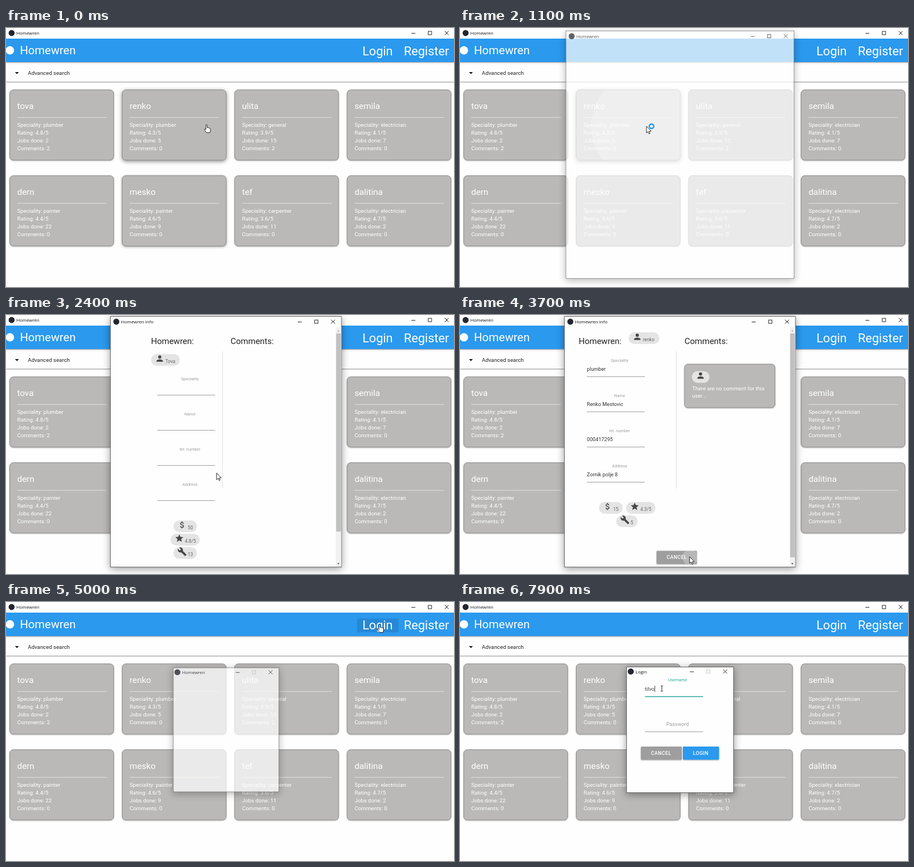
These frames come from a looping animation (800x464 px, 8 s). An HTML page:

```html
<!DOCTYPE html>
<html lang="en">
<head>
<meta charset="utf-8">
<title>Homewren</title>
<style>
  html, body { margin: 0; width: 100%; height: 100%; overflow: hidden; background: #fefefe; }
  svg { display: block; width: 800px; height: 464px; font-family: Roboto, sans-serif; }
  .title { font-family: "Open Sans", sans-serif; }
  .mid { text-anchor: middle; }
  .bar { filter: drop-shadow(0 1px 1.2px rgba(0,0,0,.45)); }
  .card { stroke: #8b8a89; filter: drop-shadow(0 1px 1px rgba(0,0,0,.25)); }
  .card.warm { filter: drop-shadow(0 1px 2px rgba(0,0,0,.4)); }
  .card.hover { filter: drop-shadow(0 2px 3.5px rgba(0,0,0,.45)); }
  .window { stroke: #666; filter: drop-shadow(0 3px 7px rgba(0,0,0,.4)); }
  .button { filter: drop-shadow(0 1px 1px rgba(0,0,0,.35)); }
  .caps { font-weight: 500; letter-spacing: .35px; }
  .cursor path { stroke: #111; stroke-width: .9; fill: #fff; stroke-linejoin: round; }
</style>
</head>
<body>
<svg id="stage" viewBox="0 0 800 464"></svg>
<script>
const LOOP = 8000, STEP = 100;
const APP = 'Homewren', BLUE = '#2a99ee', GREY = '#bab9b8', MUTED = '#9e9e9e', TEAL = '#26a69a';

const people = [
  ['tova', 'plumber', '4.8', 2, 2], ['renko', 'plumber', '4.3', 5, 0],
  ['ulita', 'general', '3.9', 15, 2], ['semila', 'electrician', '4.1', 7, 0],
  ['dern', 'painter', '4.4', 22, 0], ['mesko', 'painter', '4.6', 9, 0],
  ['tef', 'carpenter', '3.6', 11, 0], ['dalitina', 'electrician', '4.7', 2, 0]
];
const USER = 'tilvo';

// Markup helpers
const text = (x, y, size, str, fill = '#222', extra = '') =>
  `<text x="${x}" y="${y}" font-size="${size}" fill="${fill}" ${extra}>${str}</text>`;
const rect = (x, y, w, h, fill, extra = '') =>
  `<rect x="${x}" y="${y}" width="${w}" height="${h}" fill="${fill}" ${extra}/>`;
const path = (d, fill, extra = '') => `<path d="${d}" fill="${fill}" ${extra}/>`;
const line = (d, stroke, extra = '') => path(d, 'none', `stroke="${stroke}" ${extra}`);
const group = (id, body) => `<g id="${id}">${body}</g>`;

const icons = {
  person: '<circle cx="12" cy="8" r="4"/><path d="M12 14c-2.7 0-8 1.3-8 4v2h16v-2c0-2.7-5.3-4-8-4z"/>',
  star: '<path d="M12 17.3 18.2 21l-1.6-7L22 9.2l-7.2-.6L12 2 9.2 8.6 2 9.2 7.5 14 5.8 21z"/>',
  dollar: '<path d="M15 9c0-2-1.2-3-3.2-3S8 7 8 8.8c0 4 7.5 2.2 7.5 6.4 0 1.8-1.3 3-3.6 3S8 17 7.7 15M11.5 3v3m0 12v3" fill="none" stroke="#484848" stroke-width="2.1"/>',
  wrench: '<path d="M22.7 19l-9.1-9.1c.9-2.3.4-5-1.5-6.9-2-2-5-2.4-7.4-1.3L9 6 6 9 1.6 4.7C.4 7.1.9 10.1 2.9 12.1c1.9 1.9 4.6 2.4 6.9 1.5l9.1 9.1c.4.4 1 .4 1.4 0l2.3-2.3c.5-.4.5-1.1.1-1.4z"/>'
};

function chip(x, y, w, icon, label = '') {
  return rect(x, y, w, 21, '#e4e4e4', 'rx="10.5"') +
    `<g transform="translate(${x + 7} ${y - .5}) scale(.71)" fill="#484848">${icons[icon]}</g>` +
    text(x + 25.5, y + 16, 8.3, label, '#666');
}

function titleBar(x, right, y, id, dimMax) {
  const close = right - 15.5, max = right - 45.5, min = right - 75;
  return `<circle cx="${x + 10}" cy="${y}" r="5.4" fill="#23252f"/>` +
    text(x + 18.5, y + 3, 8, APP, '#111', `id="${id}" class="title"`) +
    line(`M${min - 3.5} ${y + .5}h7`, '#222') +
    rect(max - 3, y - 3, 6, 6, 'none', `stroke="${dimMax ? '#ccc' : '#222'}"`) +
    line(`M${close - 3.5} ${y - 3.5}l7 7m0-7l-7 7`, '#222');
}

function button(x, y, w, fill, label) {
  return rect(x, y, w, 23.5, fill, 'rx="1.4" class="button"') +
    text(x + 18, y + 14.5, 9, label, '#fff', 'class="caps"');
}

const cardAt = i => ({ x: 6.7 + i % 4 * 200.8, y: 110.8 + (i >> 2) * 153.8 });

function card([name, job, rating, jobs, comments], i) {
  const { x, y } = cardAt(i);
  const rows = [`Speciality: ${job}`, `Rating: ${rating}/5`, `Jobs done: ${jobs}`, `Comments: ${comments}`];
  return rect(x, y, 185.6, 126, GREY, 'rx="6.5" class="card person"') +
    (i === 1 ? `<clipPath id="cardClip">${rect(x, y, 185.6, 126, '#fff', 'rx="6.5"')}</clipPath>
      <circle id="cardRipple" cx="330" cy="176" fill="#fff" clip-path="url(#cardClip)"/>` : '') +
    text(x + 13.3, y + 34, 15.4, name, '#fff') +
    line(`M${x + 13.3} ${y + 49.5}h160`, '#e2e2e2') +
    rows.map((row, k) => text(x + 13.3, y + 66 + k * 14.2, 9.8, row, '#fff')).join('');
}

function fields(x, y, values = []) {
  return ['Speciality', 'Name', 'tel. number', 'Address'].map((label, i) => {
    const base = y + i * 63;
    return text(x + 58.5, base - 26.5, 7.4, label, MUTED, 'class="mid"') +
      line(`M${x} ${base}h103.5`, MUTED) + text(x, base - 10.5, 9.2, values[i] || '', '#333');
  }).join('');
}

function infoPage(headX, thumb) {
  return text(headX, 52, 15, APP + ':') + text(401, 52, 15, 'Comments:') +
    line('M386.5 65V311', '#e0e0e0') +
    rect(589, 22, 9.5, 429, '#f1f1f1') + rect(589.5, 33, 8.5, thumb, '#c1c1c1') +
    path('M591.5 29.500l2-2.500 2 2.500z', '#a3a3a3') + path('M591.5 444.500l2 2.500 2-2.500z', '#505050');
}

const mainPage =
  rect(0, 0, 800, 464, '#fefefe') +
  rect(0, 66, 800, 30, '#fefefe', 'class="bar"') + rect(0, 0, 800, 19, '#fff') +
  rect(0, 19, 800, 42, BLUE, 'class="bar"') + rect(0, 0, 800, 19, '#fff') +
  titleBar(0, 802.5, 9, 'mainTitle') +
  rect(627, 29.5, 74, 25, '#000', 'id="linkHover" opacity=".1" rx="1"') +
  '<circle cx="7" cy="40" r="7.5" fill="#fff"/>' +
  text(25, 47, 20.5, APP, '#fff') + text(636.5, 49, 22, 'Login', '#fff') + text(710.5, 49, 22, 'Register', '#fff') +
  path('M16 79h7l-3.500 3.500z', '#111') + text(39, 84, 9.8, 'Advanced search') +
  people.map(card).join('');

const infoWindow =
  rect(186.5, 2.5, 412.5, 449, '#fefefe', 'class="window"') + titleBar(187, 599.5, 12, 'infoTitle') +
  group('infoEmpty', infoPage(259, 355) + chip(259, 70, 51.5, 'person', 'Tova') + fields(270, 143.5) +
    chip(299, 368, 42, 'dollar', '50') + chip(294, 392, 52, 'star', '4.8/5') + chip(299, 416, 42, 'wrench', '13')) +
  group('infoFull', infoPage(212, 401) + chip(301, 31, 55, 'person', 'renko') +
    fields(226.5, 110.5, ['plumber', 'Renko Mestovic', '000417295', 'Zornik polje 8']) +
    chip(248, 335, 42.5, 'dollar', '15') + chip(296.5, 335, 52.5, 'star', '4.3/5') + chip(279, 359, 38, 'wrench', '5') +
    rect(401, 88, 161.5, 78, GREY, 'rx="6" class="card"') + chip(414, 100.5, 31.5, 'person') +
    text(414.5, 134.5, 9.6, 'There are no comment for this', '#fff') + text(414.5, 148, 9.6, 'user...', '#fff') +
    button(351, 422.5, 72, MUTED, 'CANCEL') +
    `<clipPath id="cancelClip">${rect(351, 422.5, 72, 23.5, '#fff')}</clipPath>
     <circle id="cancelRipple" cx="411" cy="434" fill="#fff" clip-path="url(#cancelClip)"/>`);

const loginWindow =
  rect(297.5, 116.5, 191, 225, '#fefefe', 'class="window"') + titleBar(295, 489, 124.5, 'loginTitle', true) +
  group('loginForm',
    text(388.5, 159, 9.2, 'Username', MUTED, 'id="userLabel" class="mid"') +
    line('M330.500 169.500h103.500', MUTED, 'id="userLine"') +
    text(330, 158.5, 9.2, '', '#444', 'id="typed"') + rect(330, 150, .9, 11, '#222', 'id="caret"') +
    text(388.5, 222, 9.2, 'Password', MUTED, 'class="mid"') + line('M330.500 232.500h103.500', MUTED) +
    button(323, 259, 73, MUTED, 'CANCEL') + button(398, 259, 64.5, BLUE, 'LOGIN'));

const cursors = `<g id="cursor" class="cursor">` +
  group('arrow', path('M0 0V12L2.8 9.6 4.6 13.6 6.4 12.8 4.7 8.900H8.400z', '#fff')) +
  group('hand', path('M-1 1a1.200 1.200 0 0 1 2.300 0V5.500l1.200-.3q.9 0 1 .9 1.600-.5 2 .6 1.500-.2 1.600 1.200V10q0 2-1 4.500H0Q-1.500 11.500-4 9.200q0-1.600 1.600-1L-1 9.200z', '#fff')) +
  group('beam', '<path d="M-2-5Q0-5 0-4 0-5 2-5M0-4V4M-2 5Q0 5 0 4 0 5 2 5" style="fill:none"/>') +
  `<circle id="busy" cx="9" cy="0" r="3.900" fill="#fff" stroke="${BLUE}" stroke-width="2.600"/></g>`;

const $ = id => document.getElementById(id);
$('stage').innerHTML = mainPage + group('info', infoWindow) + group('login', loginWindow) + cursors;
const cardRects = document.querySelectorAll('.person');

// Motion helpers
const clamp = v => Math.max(0, Math.min(1, v));
const smooth = p => p * p * (3 - 2 * p);
const mix = (a, b, p) => a + (b - a) * p;
const show = (id, on) => { $(id).style.display = on ? '' : 'none'; };
const inside = ([x, y], l, top, r, b) => x >= l && x <= r && y >= top && y <= b;

// Time, then pointer hotspot
const route = [
  [0, 358, 173], [700, 335, 177], [1100, 333, 176], [1600, 333, 176], [2400, 376, 283], [2700, 377, 287],
  [3500, 410, 433], [4000, 410, 433], [4600, 667, 40], [5200, 667, 40], [5900, 371, 170],
  [6200, 360.5, 155], [LOOP, 360.5, 155]
];

function pointer(t) {
  const i = route.findIndex(stop => stop[0] > t);
  const [t0, x0, y0] = route[i - 1], [t1, x1, y1] = route[i];
  const p = smooth((t - t0) / (t1 - t0));
  return [mix(x0, x1, p), mix(y0, y1, p)];
}

function popWindow(id, cx, cy, t, open, close) {
  const p = clamp(Math.min((t - open) / 140, 1 - (t - close) / 140));
  const s = mix(.85, 1, 1 - (1 - p) ** 2);
  show(id, p > 0);
  $(id).setAttribute('opacity', p);
  $(id).setAttribute('transform', `translate(${cx} ${cy}) scale(${s}) translate(${-cx} ${-cy})`);
  return p > 0;
}

function ripple(id, age, speed) {
  $(id).setAttribute('r', Math.max(0, age * speed));
  $(id).setAttribute('opacity', age > 0 ? .25 * clamp((700 - age) / 400) : 0);
}

function loginInput(t) {
  const p = clamp((t - 6300) / 200), focused = p > 0;
  const label = $('userLabel'), rule = $('userLine');
  label.setAttribute('y', mix(159, 142, p));
  label.setAttribute('font-size', mix(9.2, 7.4, p));
  label.setAttribute('fill', focused ? TEAL : MUTED);
  rule.setAttribute('stroke', focused ? TEAL : MUTED);
  rule.setAttribute('stroke-width', focused ? 1.5 : 1);
  $('typed').textContent = USER.slice(0, Math.max(0, Math.floor((t - 6900) / 180)));
  $('caret').setAttribute('x', 330.3 + $('typed').getComputedTextLength());
  show('caret', focused && (t >= 6900 || Math.floor((t - 6300) / 500) % 2 === 0));
}

function draw(now) {
  const t = Math.floor(now % LOOP / STEP) * STEP;
  const pos = pointer(t);
  const infoOpen = popWindow('info', 393, 227, t, 1000, 3900);
  const loginOpen = popWindow('login', 393, 229, t, 4900, LOOP + 500);

  $('infoTitle').textContent = t < 1800 ? APP : APP + ' info';
  show('infoEmpty', t >= 1900 && t < 2600);
  show('infoFull', t >= 2600);
  $('loginTitle').textContent = t < 5500 ? APP : 'Login';
  show('loginForm', t >= 5500);
  loginInput(t);

  ripple('cardRipple', t - 900, .48);
  ripple('cancelRipple', t - 3600, .14);

  const covered = infoOpen && t > 1100 || loginOpen && inside(pos, 297, 116, 489, 341);
  let onCard = false;
  cardRects.forEach((box, i) => {
    const { x, y } = cardAt(i);
    const hover = !covered && inside(pos, x, y, x + 186, y + 126);
    onCard = onCard || hover;
    box.classList.toggle('hover', hover);
    box.classList.toggle('warm', i === 5 && t < 200);
  });

  const onLink = inside(pos, 627, 29, 701, 55);
  const onInput = t >= 5500 && inside(pos, 330, 146, 434, 168);
  const busy = t >= 1000 && t < 1500;
  const hand = !busy && (onCard || onLink);
  show('linkHover', onLink);
  show('hand', hand);
  show('beam', onInput);
  show('arrow', !hand && !onInput);
  show('busy', busy);
  $('cursor').setAttribute('transform', `translate(${pos})`);
  requestAnimationFrame(draw);
}
requestAnimationFrame(draw);
</script>
</body>
</html>
```
